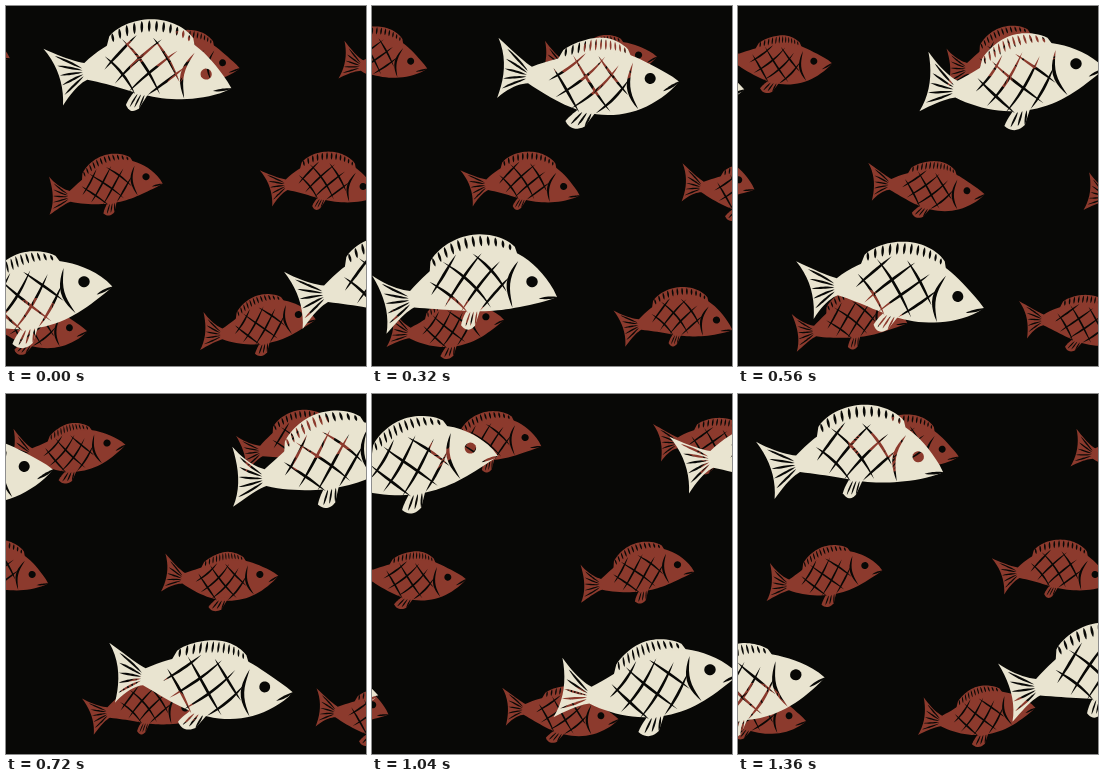
Animation, 360 px wide and 360 px high, one loop 1440 ms. Source, as an HTML page with a canvas:

```html
<!DOCTYPE html>
<html lang="en">
<head>
<meta charset="utf-8">
<title>Swimming fish</title>
<style>
  html, body { margin: 0; height: 100%; overflow: hidden; background: #080806; }
  canvas { display: block; }
</style>
</head>
<body>
<canvas id="stage" width="360" height="360"></canvas>
<script>
const SIZE = 360, STEP = 80, STEPS = 18;
const CREAM = '#e9e4d0', RED = '#8c3a2d', NIGHT = '#080806';
const { PI, sin, cos } = Math;
const stage = document.getElementById('stage').getContext('2d');
const layerCanvas = document.createElement('canvas');
layerCanvas.width = layerCanvas.height = SIZE;
const layer = layerCanvas.getContext('2d');

// Points of fn(t) for t from 0 to 1.
const trace = (fn, n = 30) => Array.from({ length: n + 1 }, (_, i) => fn(i / n));

// Quadratic curve from a to b, pulled towards c.
const bend = (a, c, b) => trace(t => [0, 1].map(k =>
  (1 - t) ** 2 * a[k] + 2 * t * (1 - t) * c[k] + t * t * b[k]), 10);

const disc = (x, y, r) => trace(t => [x + r * cos(2 * PI * t), y + r * sin(2 * PI * t)]);

// Slit tapering at both ends, optionally bowed sideways.
function cut(x0, y0, x1, y1, width, bow = 0) {
  const dx = x1 - x0, dy = y1 - y0, len = Math.hypot(dx, dy);
  const side = sign => trace(t => {
    const off = sin(PI * t) * bow + sign * width / 2 * Math.max(sin(PI * t), 0) ** 0.7;
    return [x0 + dx * t - dy / len * off, y0 + dy * t + dx / len * off];
  }, 10);
  return [...side(1), ...side(-1).reverse()];
}

// The fish at rest: x runs along the spine from the eye, tail at negative x.
const ROOT = -120, NOSE = 27;
const edge = (x, base, depth) => {
  const t = (x - ROOT) / (NOSE - ROOT);
  return base + (4 - base) * t + depth * Math.max(sin(PI * t ** 1.13), 0) ** 0.85;
};
const back = x => edge(x, -4, -36);
const belly = x => edge(x, 13, 21);
const along = t => ROOT + (NOSE - ROOT) * t;

const finX = q => -97 + 79 * q;
const finRise = q => 15.5 * Math.max(sin(PI * q), 0) ** 0.3 * (1 - 0.35 * q);

const tailTop = [-155, -27], tailLow = [-150, 33];
const solids = [
  [
    ...trace(t => [along(t), back(along(t))]),
    ...trace(t => [along(1 - t), belly(along(1 - t))]),
    ...bend([ROOT, 13], [-132, 16], tailLow),
    ...bend(tailLow, [-141, 3], tailTop),
    ...bend(tailTop, [-134, -9], [ROOT, -4])
  ],
  [
    ...trace(q => [finX(q), back(finX(q)) - finRise(q)]),
    ...trace(q => [finX(1 - q), back(finX(1 - q)) + 2])
  ],
  [...bend([-66, 25], [-74, 34], [-77, 41]), ...bend([-77, 41], [-70, 51], [-60, 43]), [-51, 25]]
];

const cuts = [
  disc(0, -5, 5.5),
  cut(-16, -23, -15, 24, 3.5, 7),
  cut(10, 10, 28, 4, 2.5)
];
// Scales: two families of crossing slits.
for (const [dir, n] of [[1, 4], [-1, 3]]) {
  for (let i = 0; i < n; i++) {
    const p = (i + 0.5) / n, half = 11 + 11 * sin(PI * p);
    const x = -94 + 65 * p, y = dir * (31 * p - 16), rise = dir * 1.15 * half;
    cuts.push(cut(x - half, y + rise, x + half, y - rise, 2.7, dir));
  }
}
for (let i = 0; i < 3; i++) cuts.push(cut(-64 + 4 * i, 29, -72 + 6 * i, 43, 1.8));
for (let i = 0; i < 5; i++) cuts.push(cut(-123, 1 + 2 * i, -146, -17 + 10 * i, 2.2));
for (let i = 1; i < 13; i++) {
  const q = i / 13, x = finX(q);
  cuts.push(cut(x, back(x), x - 1, back(x) - 0.9 * finRise(q), 2.2));
}

// A wave travels from head to tail; crest is the age at which the eye is lowest.
function drawFish({ x, y, scale, age, crest }) {
  const beat = 2 * PI * (age - crest) / 13;
  const warp = ([u, v]) => {
    const phase = beat + 0.0225 * u;
    const tilt = Math.atan(-0.252 * sin(phase));
    return [
      x + scale * (u - v * sin(tilt)),
      y + scale * (11.2 * cos(phase) + v * cos(tilt))
    ];
  };
  const fill = shape => {
    layer.beginPath();
    shape.forEach(p => layer.lineTo(...warp(p)));
    layer.fill();
  };
  layer.globalCompositeOperation = 'source-over';
  solids.forEach(fill);
  layer.globalCompositeOperation = 'destination-out';
  cuts.forEach(fill);
}

function drawSchool({ color, scale, crest, speed, eyeX, rows }, step) {
  layer.clearRect(0, 0, SIZE, SIZE);
  layer.fillStyle = color;
  for (const [y, ...starts] of rows) {
    for (const start of starts) {
      const age = step + start;
      drawFish({ x: eyeX + speed * (age - STEPS), y, scale, age, crest });
    }
  }
  stage.drawImage(layerCanvas, 0, 0);
}

// Each row: height, then the age in steps of every fish when the loop begins.
const schools = [
  { color: RED, scale: 0.635, crest: 24.5, speed: 12.73, eyeX: 140,
    rows: [[53, 6, 24, 41], [181, 0, 18, 35], [318, -6, 12, 30]] },
  { color: CREAM, scale: 1, crest: 20.5, speed: 20, eyeX: 199,
    rows: [[69, 0, 18], [287, -6, 12, 30]] }
];

function frame(now) {
  const step = Math.floor(now / STEP) % STEPS;
  stage.fillStyle = NIGHT;
  stage.fillRect(0, 0, SIZE, SIZE);
  schools.forEach(school => drawSchool(school, step));
  requestAnimationFrame(frame);
}
frame(performance.now());
</script>
</body>
</html>
```
